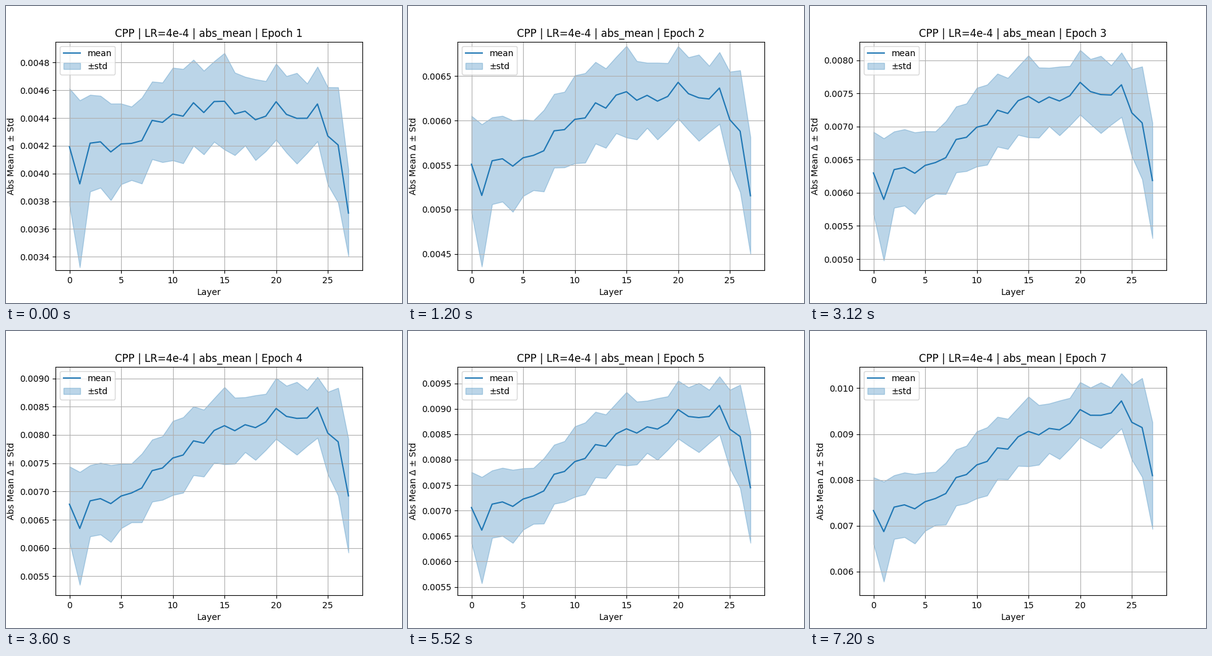
These frames come from a looping animation (640x480 px, 8 s). A matplotlib script:

```python
import numpy as np
import matplotlib.pyplot as plt
from matplotlib.animation import FuncAnimation

STEP_MS = 400
STEPS_PER_EPOCH = 3
FRAMES = 20
MID_EPOCH = 4
UNIT = 1e-6

# Shape of the curve and of its band at the middle epoch, one point per layer.
MEAN = np.array([6774, 6346, 6834, 6873, 6785, 6919, 6973, 7061, 7368, 7414,
                 7591, 7644, 7895, 7854, 8078, 8163, 8074, 8180, 8128, 8229,
                 8467, 8327, 8292, 8299, 8486, 8032, 7879, 6922])
STD = np.array([667, 998, 629, 634, 680, 570, 520, 607, 549, 563,
                655, 667, 608, 592, 569, 682, 584, 486, 572, 496,
                538, 542, 643, 495, 538, 728, 952, 1003])

# Lowest and highest value on the axis in each epoch.
SPAN = [(3377, 4876), (4433, 6772), (4987, 8125), (5347, 9023),
        (5538, 9623), (5664, 10025), (5710, 10244)]

layers = np.arange(len(MEAN))
depth = layers / layers[-1]

# Share of the middle value still missing at epoch 1, and the ratio between
# the gains of successive epochs: deeper layers start lower and settle later.
MEAN_GAP = 0.4255 - 0.0445 * np.cos(np.pi * depth / 0.85)
MEAN_RATIO = 0.6 + 0.04 * depth + 0.075 * depth**5
STD_GAP = 0.49 - 0.12 * np.exp(-(layers / 2)**2) + 0.2 * np.exp(layers - layers[-1])
STD_RATIO = 0.617


def settle(middle, gap, ratio, epoch):
    """Exponential approach that passes through the middle value at MID_EPOCH."""
    gain = (1 - ratio**float(epoch - MID_EPOCH)) / (ratio**float(1 - MID_EPOCH) - 1)
    return middle * (1 + gap * gain) * UNIT


fig, ax = plt.subplots(figsize=(6.4, 4.8), dpi=100)


def draw(step):
    epoch = step // STEPS_PER_EPOCH + 1
    mean = settle(MEAN, MEAN_GAP, MEAN_RATIO, epoch)
    std = settle(STD, STD_GAP, STD_RATIO, epoch)
    low, high = SPAN[epoch - 1]
    margin = 0.05 * (high - low)

    ax.clear()
    ax.plot(layers, mean, label="mean")
    ax.fill_between(layers, mean - std, mean + std, color="C0", alpha=0.3, label="±std")
    ax.set_ylim((low - margin) * UNIT, (high + margin) * UNIT)
    ax.set_title(f"CPP | LR=4e-4 | abs_mean | Epoch {epoch}")
    ax.set_xlabel("Layer")
    ax.set_ylabel("Abs Mean Δ ± Std")
    ax.grid(True)
    ax.legend(loc="upper left")
    return ax.get_children()


anim = FuncAnimation(fig, draw, frames=FRAMES, interval=STEP_MS,
                     repeat=True, repeat_delay=0, blit=False)
plt.show()
```
